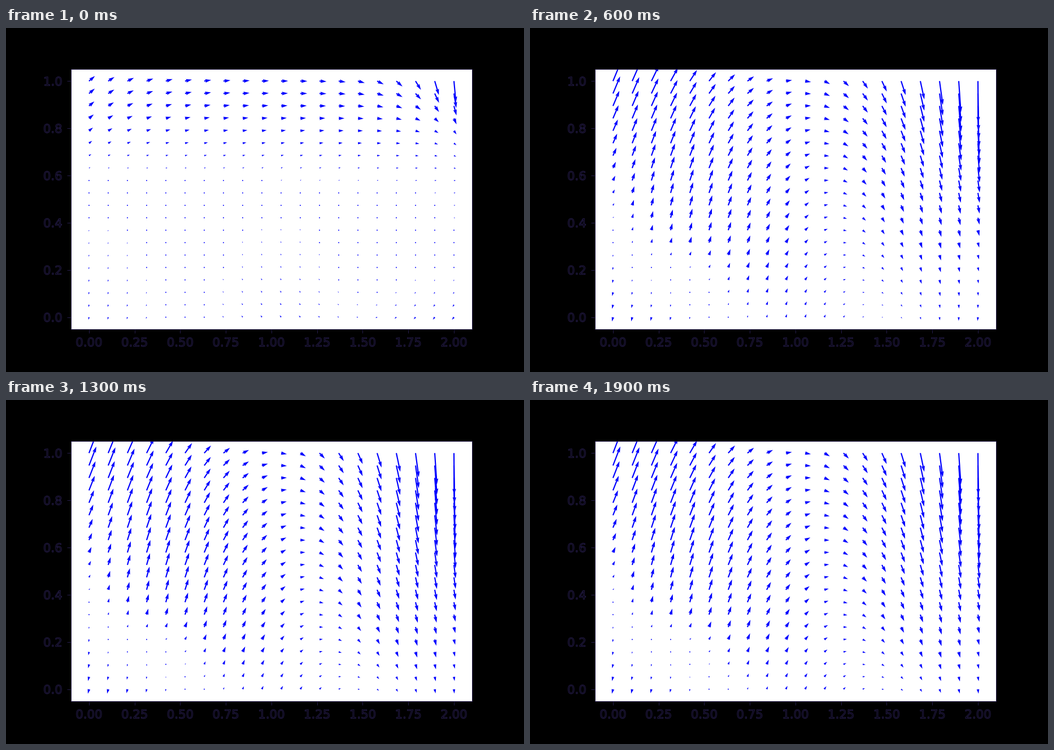
Recreate the animation shown at these times as a matplotlib script. Size 917 by 611 pixels, loop 2000 ms.

```python
import numpy as np
import matplotlib.pyplot as plt
from matplotlib import patheffects
from matplotlib.animation import FuncAnimation

DPI = 128
PX = 72 / DPI              # one pixel in points
PT = 152.75 / DPI          # the plot's own point size
FRAMES, INTERVAL = 20, 100
N = 20                     # arrows per side
DIM = "#251c4a"

pi, sin, cos, exp = np.pi, np.sin, np.cos, np.exp
x, y = np.meshgrid(np.linspace(0, 1, N), np.linspace(1, 0, N))


def through(low, mid, top):
    """Parabola in y through the bottom, middle and top profiles."""
    return (1 - y) * (1 - 2 * y) * low + 4 * y * (1 - y) * mid + y * (2 * y - 1) * top


def bump(cx, cy, wx, wy):
    return exp(-((x - cx) / wx) ** 2 - ((y - cy) / wy) ** 2)


def first_flow():
    """A thin stream along the top edge that dives at the right corner."""
    z = np.clip((y - 0.45) / 0.55, 0, 1)
    layer = z * z * (3 - 2 * z)
    belly = 4 * y * (1 - y)
    u = ((12.5 - 2 * (1 - x) ** 6 - 9 * x ** 10) * layer
         + 3.5 * x ** 4 * belly - (1 + 2.5 * x) * (1 - y) ** 2)
    v = (9 * (1 - x) ** 4 * layer - 38 * x ** 8 * y ** 7
         + 2 * x ** 2 * belly - (0.5 + 4 * cos(2 * pi * x)) * (1 - y) ** 1.5)
    return u, v


def settled_flow():
    """The large clockwise swirl, lengths in pixels."""
    u = through(low=1 - 3 * cos(4.7 * x),
                mid=3 + 5.5 * sin(pi * x),
                top=14.5 - 8 * x - 6 * x ** 12)
    v = through(low=-1 - 7 * cos(2 * pi * x),
                mid=23 * cos(3.9 * (x - 0.19)) - 11 * (1 - x) ** 8,
                top=38 * cos(pi * x) - 8 * sin(2 * pi * x) - 36 * x ** 10)
    return u, v - 8 * bump(0.2, 0.18, 0.12, 0.13)


(u0, v0), (u1, v1) = first_flow(), settled_flow()

# The right side settles fast at the top and slowly further down.
tau = 3.5 + 3 * x ** 3 * (1 - 1.7 * y ** 2)


def flow(step):
    p = 1 - exp(-(step / tau) ** 1.3)
    return u0 + (u1 - u0) * p, v0 + (v1 - v0) * p


fig = plt.figure(figsize=(917 / DPI, 611 / DPI), dpi=DPI, facecolor="black")
ax = fig.add_axes([0.125, 0.125, 0.775, 0.755], facecolor="white")
ax.set_xlim(-0.1, 2.1)
ax.set_ylim(-0.05, 1.05)
ax.set_xticks(np.linspace(0, 2, 9), [f"{t:.2f}" for t in np.linspace(0, 2, 9)])
ax.set_yticks(np.linspace(0, 1, 6), [f"{t:.1f}" for t in np.linspace(0, 1, 6)])
ax.tick_params(length=3.5 * PT, width=PX, pad=3.5 * PT, color=DIM,
               labelsize=10 * PT, labelcolor="black",
               labelfontfamily="DejaVu Sans")
for spine in ax.spines.values():
    spine.set(linewidth=PX, edgecolor=DIM)

outline = [patheffects.Stroke(linewidth=PX, foreground=DIM)]
for label in ax.get_xticklabels() + ax.get_yticklabels():
    label.set_path_effects(outline)

arrows = ax.quiver(2 * x, y, *flow(0), color="blue", units="width", width=0.003,
                   angles="uv", scale_units="dots", scale=1)


def draw(step):
    arrows.set_UVC(*flow(step))
    return arrows,


anim = FuncAnimation(fig, draw, frames=FRAMES, interval=INTERVAL,
                     init_func=lambda: draw(0), repeat=True, repeat_delay=0)
plt.show()
```
